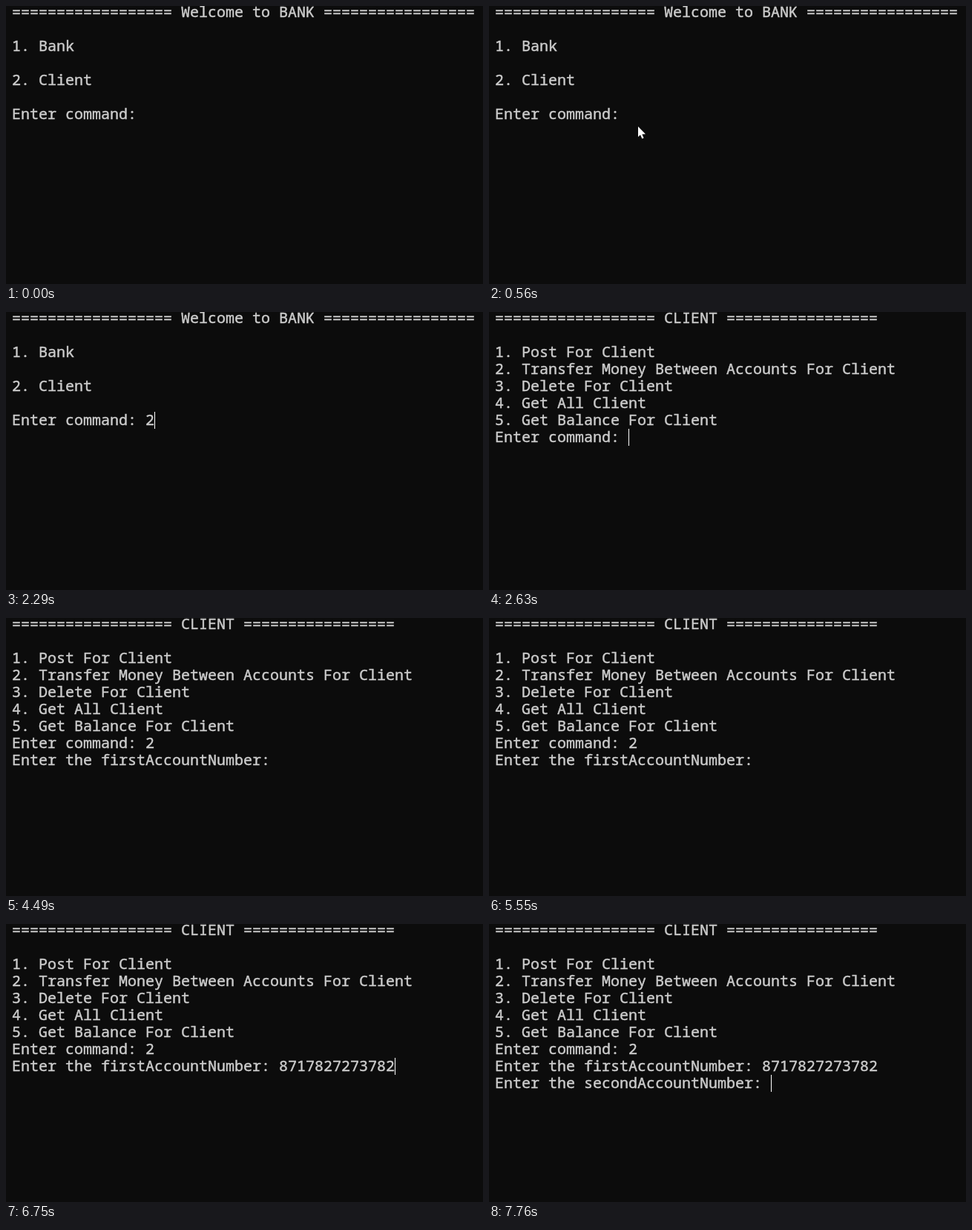
An HTML page with a canvas that plays this animation: 643x376 px, repeating every 8 s.

```html
<!DOCTYPE html>
<html lang="en">
<head>
<meta charset="utf-8">
<title>Terminal session</title>
<style>
html, body { margin: 0; width: 100%; height: 100%; overflow: hidden; background: #0c0c0c; }
canvas { display: block; }
</style>
</head>
<body>
<canvas id="term" width="643" height="376"></canvas>
<script>
const ctx = document.getElementById('term').getContext('2d');
const LOOP = 8000, CELL = 12, ROW = 23, LEFT = 8, TOP = -3, BASE = 18;
const BLINK = 530, BLINK_DELAY = 140;

// Moments of the session, in ms
const at = {
  move: 220, rest: 830, click: 1030, release: 1230, pick: 2290, menu: 2630,
  choose: 3560, first: 3820, type: 5950, typed: 6750, enter: 7680, second: 7760
};

const header = title => '='.repeat(18) + ` ${title} ` + '='.repeat(17);
const welcome = [header('Welcome to BANK'), '', '1. Bank', '', '2. Client', '', 'Enter command: '];
const client = [
  header('CLIENT'), '',
  '1. Post For Client',
  '2. Transfer Money Between Accounts For Client',
  '3. Delete For Client',
  '4. Get All Client',
  '5. Get Balance For Client',
  'Enter command: '
];
const account = '8717827273782';

// Keys arrive at an even pace between the first and last digit
function typedDigits(t) {
  if (t < at.type) return '';
  const pace = (at.typed - at.type) / (account.length - 1);
  return account.slice(0, 1 + Math.floor((t - at.type) / pace));
}

function linesAt(t) {
  const lines = t < at.menu ? [...welcome] : [...client];
  if (t >= at.choose || (t >= at.pick && t < at.menu)) lines[lines.length - 1] += '2';
  if (t >= at.first) lines.push('Enter the firstAccountNumber: ' + typedDigits(t));
  if (t >= at.second) lines.push('Enter the secondAccountNumber: ');
  return lines;
}

// The caret stays lit shortly after each input, then blinks
function caretLit(t) {
  if (t < at.click) return false;
  const inputs = [at.click - BLINK_DELAY, at.pick, at.menu, at.choose, at.first, at.enter, at.second];
  if (t >= at.type) inputs.push(Math.min(t, at.typed));
  const last = Math.max(...inputs.filter(time => time <= t));
  const idle = Math.max(0, t - last - BLINK_DELAY);
  return Math.floor(idle / BLINK) % 2 === 0;
}

// Sweeps left, overshoots, then settles beside the prompt
function pointerAt(t) {
  const k = Math.min(1, (t - at.move) / (at.rest - at.move));
  const v = (1 - k) ** 2, u = 1 - v;
  const bend = (a, b, c) => Math.round(v * v * a + 2 * u * v * b + u * u * c);
  return [bend(459, 113, 229), bend(292, 190, 143)];
}

function drawPointer(x, y) {
  ctx.fillStyle = '#fff';
  ctx.fill(new Path2D(`M${x} ${y} v14 l3 -2.7 2.4 5.3 2.2 -1 -2.3 -5.1 4.7 -.3z`));
}

function drawText(text, x, y) {
  ctx.fillText(text, x, y);
  ctx.strokeText(text, x, y);
}

function draw(t) {
  ctx.fillStyle = '#0c0c0c';
  ctx.fillRect(0, 0, 643, 376);

  const lines = linesAt(t);
  ctx.fillStyle = ctx.strokeStyle = '#ccc';
  ctx.lineWidth = 0.45;
  ctx.font = '20px "Noto Sans Mono", "DejaVu Sans Mono", monospace';
  lines.forEach((line, i) => drawText(line, LEFT, TOP + i * ROW + BASE));

  if (caretLit(t)) {
    const row = lines.length - 1;
    ctx.fillStyle = '#fff';
    ctx.fillRect(LEFT + lines[row].length * CELL, TOP + row * ROW, 1, ROW);
  }

  if (t >= at.move && t < at.pick) drawPointer(...pointerAt(t));
  if (t >= at.click && t < at.release) {
    ctx.fillStyle = 'rgba(255, 255, 0, .5)';
    ctx.beginPath();
    ctx.arc(228, 141, 15, 0, Math.PI * 2);
    ctx.fill();
  }
}

const begin = performance.now();
function tick() {
  draw((performance.now() - begin) % LOOP);
  requestAnimationFrame(tick);
}
tick();
</script>
</body>
</html>
```
